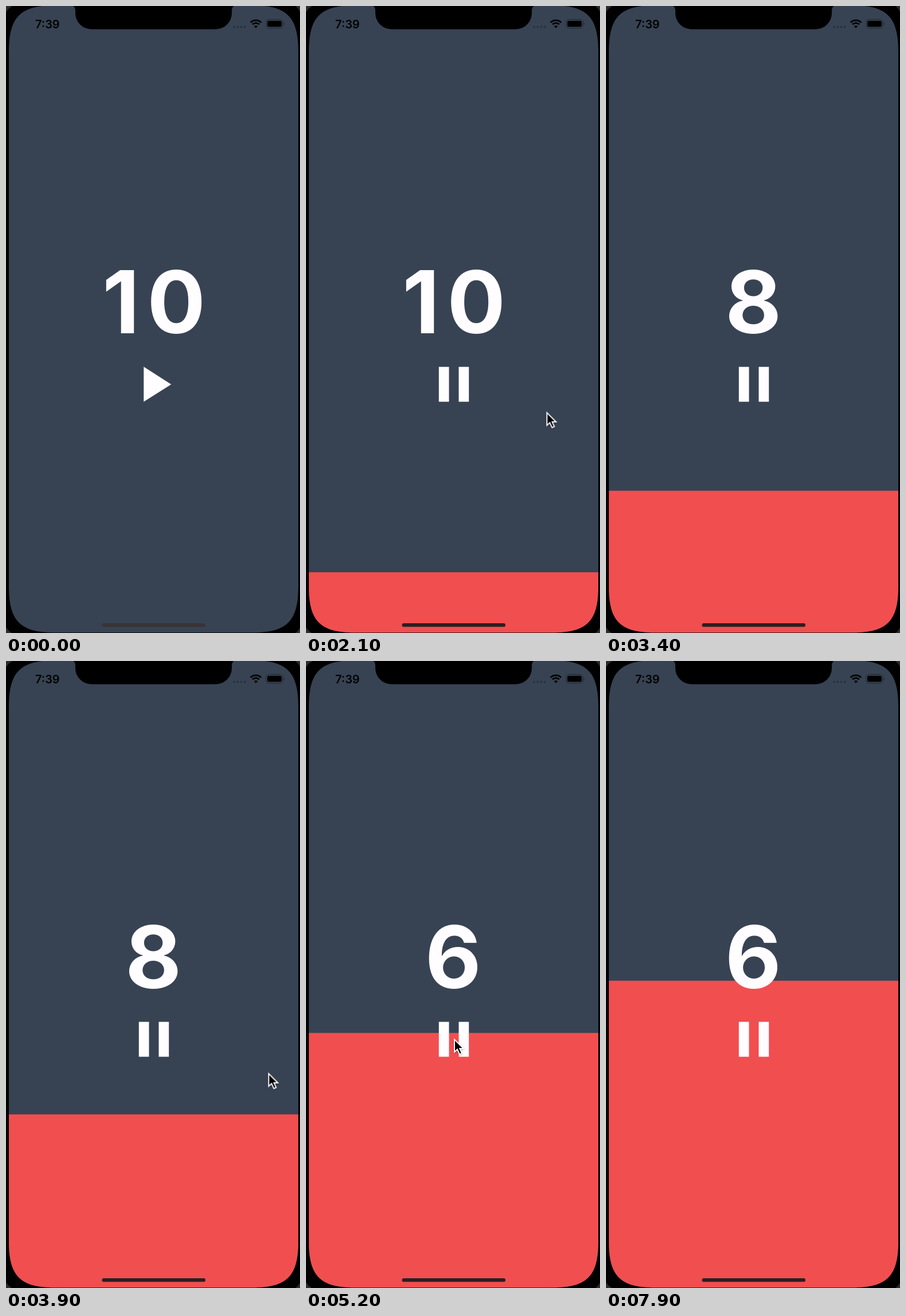
An HTML page for the animation above (8 s loop, 513x1092 px).

```html
<!DOCTYPE html>
<html lang="en">
<head>
<meta charset="utf-8">
<title>Countdown timer</title>
<style>
  html, body { margin: 0; width: 100%; height: 100%; overflow: hidden; background: #000; }
  svg { display: block; width: 513px; height: 1092px; }

  .clock { font: 600 20px Inter, sans-serif; }
  .digits { font: 700 151px Inter, sans-serif; }
  .white { fill: #fffdff; }

  .fill, .cursor, .home { animation: 8s linear infinite; }
  .fill { animation-name: rise; }
  .home { animation-name: darken; }
  .cursor { animation-name: wander; filter: drop-shadow(0 1px 1.5px rgba(0, 0, 0, .35)); }

  .step { opacity: 0; animation: 8s step-end infinite; }
  .ten { animation-name: ten; }
  .nine { animation-name: nine; }
  .eight { animation-name: eight; }
  .seven { animation-name: seven; }
  .six { animation-name: six; }
  .play { animation-name: play; }
  .pause { animation-name: pause; }

  /* 109.2px per second: the full screen in ten seconds, held while paused */
  @keyframes rise {
    0%, 14.15% { transform: translateY(1092px); }
    68.76%, 92.11% { transform: translateY(615px); }
    100% { transform: translateY(546px); }
  }
  @keyframes darken {
    0%, 14.15% { fill: #3a3335; }
    18%, 100% { fill: #292023; }
  }

  @keyframes ten { 0% { opacity: 1; } 26.65%, 100% { opacity: 0; } }
  @keyframes nine { 0% { opacity: 0; } 26.65% { opacity: 1; } 39.15%, 100% { opacity: 0; } }
  @keyframes eight { 0% { opacity: 0; } 39.15% { opacity: 1; } 51.65%, 100% { opacity: 0; } }
  @keyframes seven { 0% { opacity: 0; } 51.65% { opacity: 1; } 64.15%, 100% { opacity: 0; } }
  @keyframes six { 0% { opacity: 0; } 64.15%, 100% { opacity: 1; } }

  @keyframes play {
    0% { opacity: 1; } 14.15% { opacity: 0; }
    68.76% { opacity: 1; } 92.11%, 100% { opacity: 0; }
  }
  @keyframes pause {
    0% { opacity: 0; } 14.15% { opacity: 1; }
    68.76% { opacity: 0; } 92.11%, 100% { opacity: 1; }
  }

  @keyframes wander {
    0%, 10% { transform: translate(530px, 800px); animation-timing-function: ease-out; }
    13.2%, 21.5% { transform: translate(257px, 661px); animation-timing-function: ease-in; }
    28%, 48% { transform: translate(530px, 740px); animation-timing-function: ease-out; }
    52.5%, 93.5% { transform: translate(259px, 659px); animation-timing-function: ease-in; }
    98%, 100% { transform: translate(530px, 740px); }
  }
</style>
</head>
<body>
<svg viewBox="0 0 513 1092">
  <defs>
    <clipPath id="screen">
      <path d="M5 79c0-60 20-80 80-80H430c60 0 80 20 80 80V1011.3c0 60-20 80-80 80H85c-60 0-80-20-80-80Z"/>
    </clipPath>
  </defs>

  <rect width="513" height="1092"/>
  <path fill="#2b2b2c" d="M0 0H11Q4 4 0 11ZM513 0H505Q510 4 513 10ZM0 1092H10Q4 1088 0 1082ZM513 1092H505Q510 1088 513 1083Z"/>

  <g clip-path="url(#screen)">
    <rect y="-1" width="513" height="1093" fill="#374353"/>
    <rect class="fill" width="513" height="1092" fill="#f14e50"/>
  </g>
  <path d="M114-1Q121 0 121 8V12.5A28 28 0 0 0 149 40.5H366A28 28 0 0 0 394 12.5V8Q394 0 401-1Z"/>

  <text class="clock" x="72.3" y="38.5" text-anchor="middle">7:39</text>
  <g fill="#293240">
    <circle cx="398" cy="36.5" r="2"/>
    <circle cx="404.3" cy="36.5" r="2"/>
    <circle cx="410.5" cy="36.5" r="2"/>
    <circle cx="416.8" cy="36.5" r="2"/>
  </g>
  <path fill="none" stroke="#000" stroke-width="2.9" d="M426.7 28.7A13.2 13.2 0 0 1 445.3 28.7M430.1 32.1A8.3 8.3 0 0 1 441.9 32.1"/>
  <path d="M436 38.5l-3.2-3.2a4.5 4.5 0 0 1 6.4 0z"/>
  <rect x="453.8" y="23.3" width="29.4" height="15.4" rx="4.5" fill="none" stroke="#1f2733"/>
  <rect x="456" y="25.7" width="25" height="10.6" rx="2.4"/>
  <path fill="#1f2733" d="M484.7 28.5Q487 31 484.7 33.5Z"/>

  <g class="digits white">
    <g class="step ten"><text x="199" y="570">1</text><text x="296.7" y="570">0</text></g>
    <g class="step nine"><text x="256.7" y="570">9</text></g>
    <g class="step eight"><text x="257" y="570">8</text></g>
    <g class="step seven"><text x="256.7" y="570">7</text></g>
    <g class="step six"><text x="256.7" y="570">6</text></g>
  </g>

  <path class="step play white" d="M240.3 628.3V689.3L288.3 659Z"/>
  <path class="step pause white" d="M231.8 628.4h17.7v60.8h-17.7zM266.5 628.4h17.7v60.8h-17.7z"/>

  <rect class="home" x="167.5" y="1075" width="180.5" height="6.3" rx="3.15"/>
  <path class="cursor" d="M0 0V22L5 17.4L9 26L13 24.2L9.2 16H16Z" stroke="#fff" stroke-width="1.9"/>
</svg>
<script>
  // Centre the visible shape of each digit on its x position.
  const ctx = document.createElement('canvas').getContext('2d');
  ctx.font = '700 151px Inter, sans-serif';
  for (const el of document.querySelectorAll('.digits text')) {
    const m = ctx.measureText(el.textContent);
    const shift = (m.actualBoundingBoxLeft - m.actualBoundingBoxRight) / 2;
    el.setAttribute('x', +el.getAttribute('x') + shift);
  }
</script>
</body>
</html>
```
